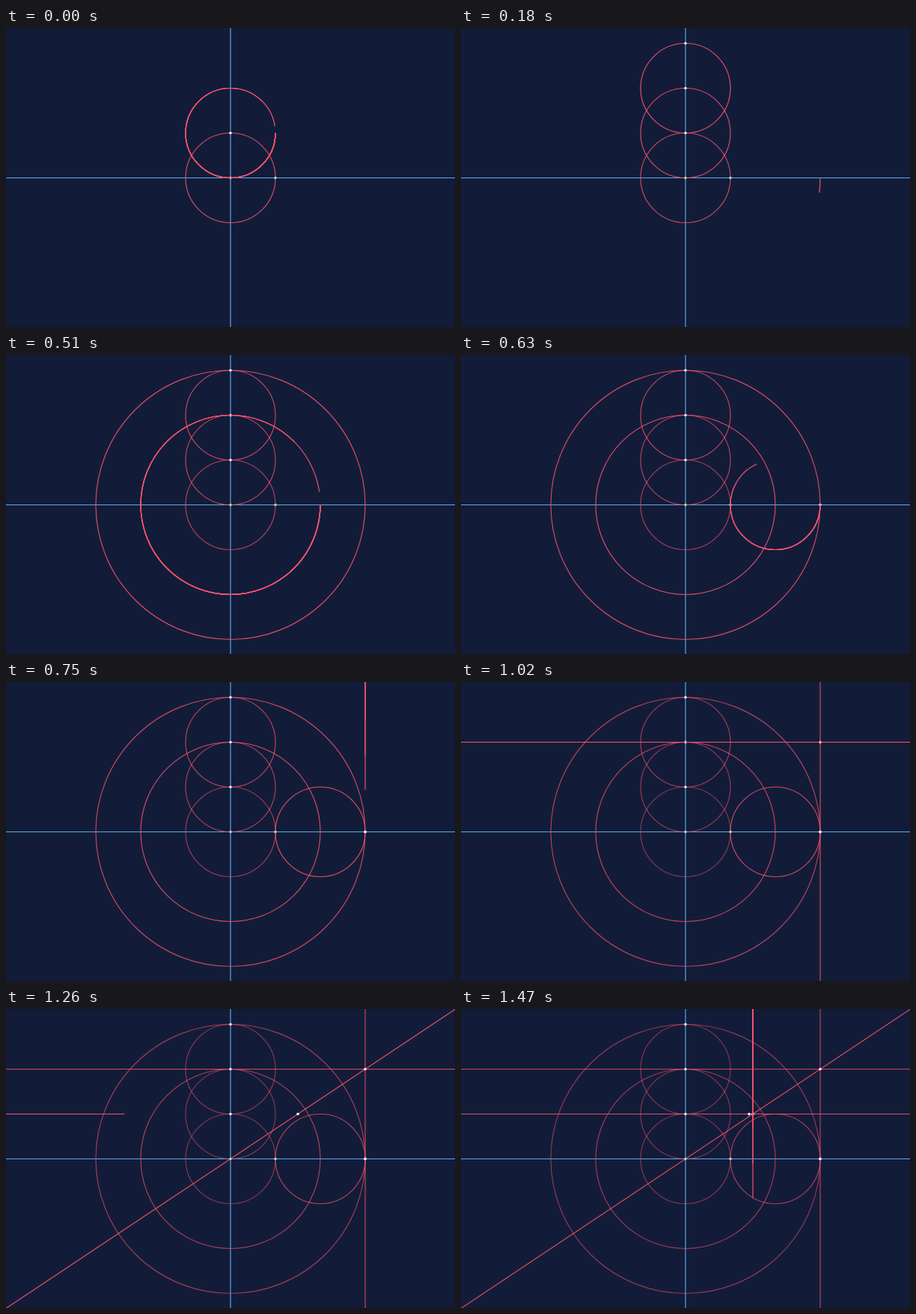
An HTML page with a canvas for the animation above (1.5 s loop, 600 by 400 pixels).

```html
<!DOCTYPE html>
<html lang="en">
<head>
<meta charset="utf-8">
<title>Compass and line construction</title>
<style>
  html, body { margin: 0; overflow: hidden; background: #121c38; }
  canvas { display: block; }
</style>
</head>
<body>
<canvas id="stage" width="600" height="400"></canvas>
<script>
const ctx = document.getElementById('stage').getContext('2d');
const LOOP = 1500, STEP = 170, TRAILS = 10;
const RED = '#f8526f', BLUE = '#5aacf2', GREEN = '#a9dca6', WHITE = '#f0f4fa';

// Each shape returns a function that traces its first part, from 0 to 1.
const circle = (x, y, r) => p => ctx.arc(x, y, r, 0, p * 2 * Math.PI);
const line = (x1, y1, x2, y2) => p => {
  ctx.moveTo(x1, y1);
  ctx.lineTo(x1 + (x2 - x1) * p, y1 + (y2 - y1) * p);
};
const vertical = x => line(x, -36, x, 427);
const horizontal = y => line(-333, y, 933, y);

const steps = [
  { start: -335, trace: circle(300, 200, 60) },
  { start: -165, trace: circle(300, 140, 60), dot: [300, 140] },
  { start: 5, trace: circle(300, 80, 60), dot: [300, 80] },
  { start: 178, trace: circle(300, 200, 180), dot: [300, 20] },
  { start: 345, trace: circle(300, 200, 120) },
  { start: 515, trace: circle(420, 200, 60), dot: [480, 200] },
  { start: 685, trace: vertical(480), dot: [480, 200] },
  { start: 855, trace: horizontal(80), dot: [480, 80] },
  { start: 1025, trace: line(-330, 620, 930, -220) },
  { start: 1195, trace: horizontal(140), dot: [390, 140] },
  { start: 1365, trace: vertical(390), dot: [385, 140] },
];

function stroke(trace, part, color, alpha = 1) {
  ctx.globalAlpha = alpha;
  ctx.strokeStyle = color;
  ctx.beginPath();
  trace(part);
  ctx.stroke();
  ctx.globalAlpha = 1;
}

function drawDot([x, y], color) {
  ctx.fillStyle = color;
  ctx.beginPath();
  ctx.arc(x, y, 1.8, 0, 2 * Math.PI);
  ctx.fill();
}

function draw(time) {
  ctx.setTransform(1, 0, 0, 1, 0, 0);
  ctx.fillStyle = '#121c38';
  ctx.fillRect(0, 0, 600, 400);
  ctx.translate(0, 0.5);
  ctx.lineWidth = 1.15;

  const begun = steps.filter(s => s.start <= time);
  const current = begun[begun.length - 1];

  stroke(line(300, -1, 300, 400), 1, BLUE);
  stroke(line(0, 200, 600, 200), 1, BLUE);
  for (const s of begun) {
    if (s === current) continue;
    stroke(s.trace, 1, RED, Math.max(0.52, 1 - 0.06 * (time - s.start) / STEP));
  }

  drawDot([300, 200], GREEN);
  drawDot([360, 200], GREEN);
  for (const s of begun) if (s.dot) drawDot(s.dot, WHITE);

  // Overlapping passes make the older part of the growing stroke bolder.
  const part = Math.min(1, (time - current.start) / STEP);
  for (let p = part; p > 0; p -= 1 / TRAILS) stroke(current.trace, p, RED);
}

const origin = performance.now();
function tick() {
  draw((performance.now() - origin) % LOOP);
  requestAnimationFrame(tick);
}
tick();
</script>
</body>
</html>
```
